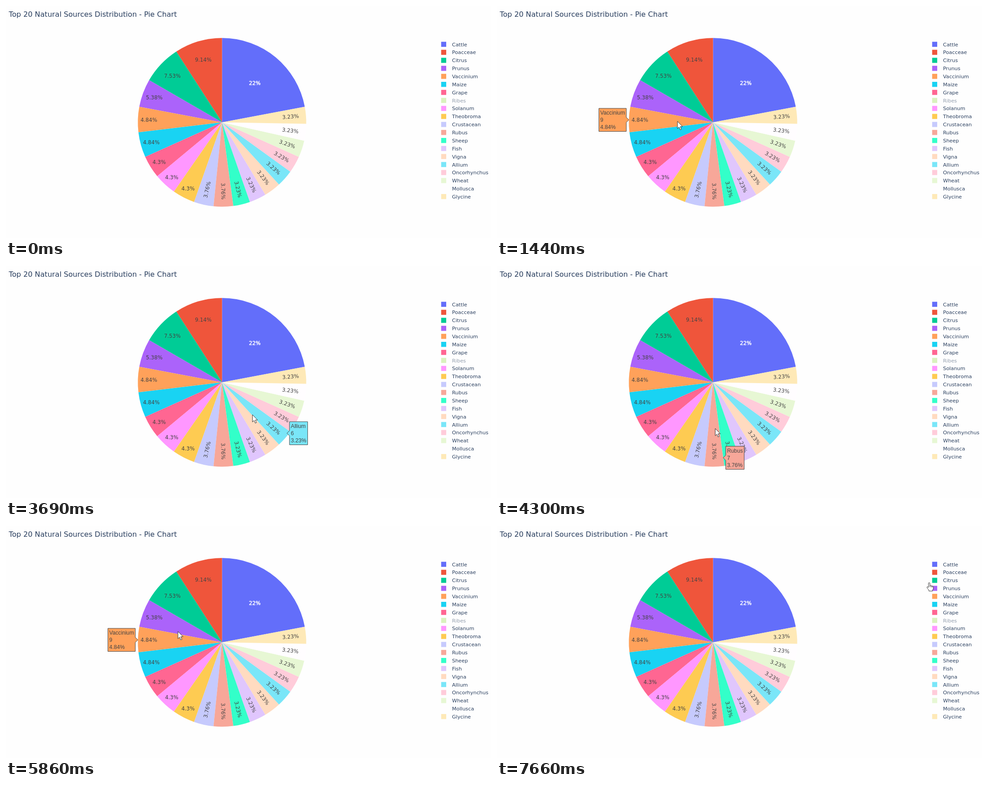
An HTML page with a canvas for the animation above (8 s loop, 1083 by 517 pixels).

```html
<!DOCTYPE html>
<html lang="en">
<head>
<meta charset="utf-8">
<title>Pie chart</title>
<style>
  html, body { margin: 0; width: 100%; height: 100%; overflow: hidden; background: #fefefe; }
  canvas { display: block; }
</style>
</head>
<body>
<canvas id="stage" width="1083" height="517"></canvas>
<script>
const ctx = document.getElementById('stage').getContext('2d');
const LOOP = 8000, CX = 482.4, CY = 259.3, R = 188, TAU = Math.PI * 2;
const DARK = '#444', NAVY = '#2a3f5f', SANS = '"DejaVu Sans", sans-serif';

// name, count, colour, centre of an upright label (otherwise it runs along the radius)
const items = [
  ['Cattle', 41, '#636efa', 555.5, 171.5], ['Poacceae', 17, '#ef553b', 440.5, 119.5],
  ['Citrus', 14, '#00cc96', 371.5, 155.5], ['Prunus', 10, '#ab63fa', 331, 204],
  ['Vaccinium', 9, '#ffa15a', 319, 254], ['Maize', 9, '#19d3f3', 324.5, 303.5],
  ['Grape', 8, '#ff6692', 342, 347.5], ['Ribes', 0, '#b6e880'],
  ['Solanum', 8, '#ff97ff', 370, 382], ['Theobroma', 8, '#fecb52', 406.5, 407],
  ['Crustacean', 7, '#c6cafd'], ['Rubus', 7, '#f7a799'], ['Sheep', 6, '#33ffc9'],
  ['Fish', 6, '#e0c6fd'], ['Vigna', 6, '#ffdbc0'], ['Allium', 6, '#7ae6f8'],
  ['Oncorhynchus', 6, '#ffccda'], ['Wheat', 6, '#e7f7d4'], ['Mollusca', 6, '#fffdff'],
  ['Glycine', 6, '#fee9b7']
].map(([name, count, color, x, y]) => ({ name, count, color, x, y }));
const total = items.reduce((sum, s) => sum + s.count, 0);

// The first slice runs clockwise from the top, the others counterclockwise.
let turn = 0;
items.forEach((s, i) => {
  const span = s.count / total * TAU;
  s.from = i ? turn : TAU - span;
  s.to = s.from + span;
  if (i) turn = s.to;
  s.mid = (s.from + s.to) / 2;
  s.percent = +(s.count / total * 100).toPrecision(3) + '%';
  s.ink = i ? DARK : '#fff';
});

// start, end, start point, control point, end point of each pointer move
const moves = [
  [110, 450, 925, 494, 760, 437, 596, 379],
  [720, 1510, 596, 379, 425, 272, 397, 253],
  [1530, 2330, 397, 253, 450, 130, 552, 224],
  [2370, 3160, 552, 224, 573, 241, 594, 258],
  [3180, 3960, 594, 258, 561, 314, 527, 370],
  [3990, 4770, 527, 370, 478, 360, 425, 350],
  [4800, 5580, 425, 350, 366, 328, 376, 262],
  [5610, 6410, 376, 262, 373, 219, 470, 175],
  [6440, 6720, 470, 175, 495, 168, 521, 165],
  [7030, 7660, 521, 165, 743, 145, 965, 126]
];

function pointerAt(t) {
  const m = moves.filter(v => v[0] <= t).pop();
  if (!m) return null;
  const k = Math.min(1, (t - m[0]) / (m[1] - m[0])), j = 1 - k;
  const bezier = i => j * j * m[i] + 2 * j * k * m[i + 2] + k * k * m[i + 4];
  return { x: bezier(2), y: bezier(3) };
}

function sliceAt(p) {
  const dx = p.x - CX, dy = p.y - CY;
  if (Math.hypot(dx, dy) > R) return null;
  const a = (Math.atan2(-dx, -dy) + TAU) % TAU;
  return items.find(s => a >= s.from && a < s.to);
}

function text(str, x, y, size, color, font = SANS, align = 'left') {
  ctx.font = `${size}px ${font}`;
  ctx.textAlign = align;
  ctx.fillStyle = color;
  ctx.fillText(str, x, y);
}

function drawSlice(s) {
  ctx.beginPath();
  ctx.moveTo(CX, CY);
  ctx.arc(CX, CY, R, -Math.PI / 2 - s.to, -Math.PI / 2 - s.from);
  ctx.fillStyle = s.color;
  ctx.fill();
}

function drawLabel(s) {
  ctx.save();
  if (s.x) ctx.translate(s.x, s.y);
  else {
    const dx = -Math.sin(s.mid), dy = -Math.cos(s.mid);
    ctx.translate(CX + 153.5 * dx, CY + 153.5 * dy);
    ctx.rotate(Math.atan2(dy, dx) + (dx < 0 ? Math.PI : 0));
  }
  text(s.percent, 0, 4.2, 11.7, s.ink, SANS, 'center');
  if (s.ink !== DARK) {
    ctx.strokeStyle = s.ink;
    ctx.lineWidth = 0.5;
    ctx.strokeText(s.percent, 0, 4.2);
  }
  ctx.restore();
}

function drawLegend(s, i) {
  const y = 85.3 + i * 17.86;
  ctx.globalAlpha = s.count ? 1 : 0.5;
  ctx.fillStyle = s.color;
  ctx.fillRect(971.7, y - 5.6, 11.3, 11.3);
  text(s.name, 996, y + 4.3, 11.3, NAVY);
  ctx.globalAlpha = 1;
}

// The tooltip points at the edge of the circle inscribed in the slice.
function drawTooltip(s) {
  const sine = Math.sin((s.to - s.from) / 2), inner = R * sine / (1 + sine);
  const dx = -Math.sin(s.mid), side = dx < 0 ? -1 : 1;
  const x = CX + (R - inner) * dx + side * inner;
  const y = CY - (R - inner) * Math.cos(s.mid);
  const lines = [s.name, s.count, s.percent], font = '"Liberation Sans", Arial, sans-serif';
  ctx.font = `12.2px ${font}`;
  const width = Math.max(...lines.map(l => ctx.measureText(l).width)) + 6;
  const near = x + side * 5.7, far = near + side * width, half = 25.7;
  ctx.beginPath();
  [[x, y], [near, y - 5.7], [near, y - half], [far, y - half],
   [far, y + half], [near, y + half], [near, y + 5.7]].forEach(p => ctx.lineTo(...p));
  ctx.closePath();
  ctx.fillStyle = s.color;
  ctx.fill();
  ctx.strokeStyle = s.ink;
  ctx.lineWidth = 1;
  ctx.stroke();
  lines.forEach((l, i) => text(l, Math.min(near, far) + 3, y + 4.4 + (i - 1) * 15.9, 12.2, s.ink, font));
}

const arrow = new Path2D('M0 0V16.2L3.7 12.8 6.2 18.8 8.9 17.7 6.4 11.8H11.4Z');
const hand = new Path2D('M-1.6 11V1.9Q-1.6.4 0 .4T1.6 1.9V6.6Q4.3 5.7 4.5 7.4 7 6.6 7.1 8.3 9.3 7.8 9.3 9.8V13Q9 15.5 7.6 16.6V19H-.6V17Q-2.6 14.5-4.8 11.4-5.4 9.8-4 9.4-2.8 9.3-1.6 11ZM1.6 6.6V10M4.5 7.4V10.5M7.1 8.3V11');

function drawPointer(p) {
  ctx.save();
  ctx.translate(p.x, p.y);
  const shape = p.x > 956 ? hand : arrow;
  ctx.fillStyle = '#fff';
  ctx.fill(shape);
  ctx.strokeStyle = '#333';
  ctx.lineWidth = 1;
  ctx.stroke(shape);
  ctx.restore();
}

function draw(t) {
  ctx.fillStyle = '#fefefe';
  ctx.fillRect(0, 0, 1083, 517);
  text('Top 20 Natural Sources Distribution - Pie Chart', 6.3, 24.3, 16.15, NAVY);
  const slices = items.filter(s => s.count);
  slices.forEach(drawSlice);
  slices.forEach(drawLabel);
  items.forEach(drawLegend);
  const late = pointerAt(t - 50); // the tooltip trails the pointer a little
  const hovered = late && sliceAt(late);
  if (hovered) drawTooltip(hovered);
  const pointer = pointerAt(t);
  if (pointer) drawPointer(pointer);
}

const begin = performance.now();
function tick() {
  draw((performance.now() - begin) % LOOP);
  requestAnimationFrame(tick);
}
tick();
</script>
</body>
</html>
```
